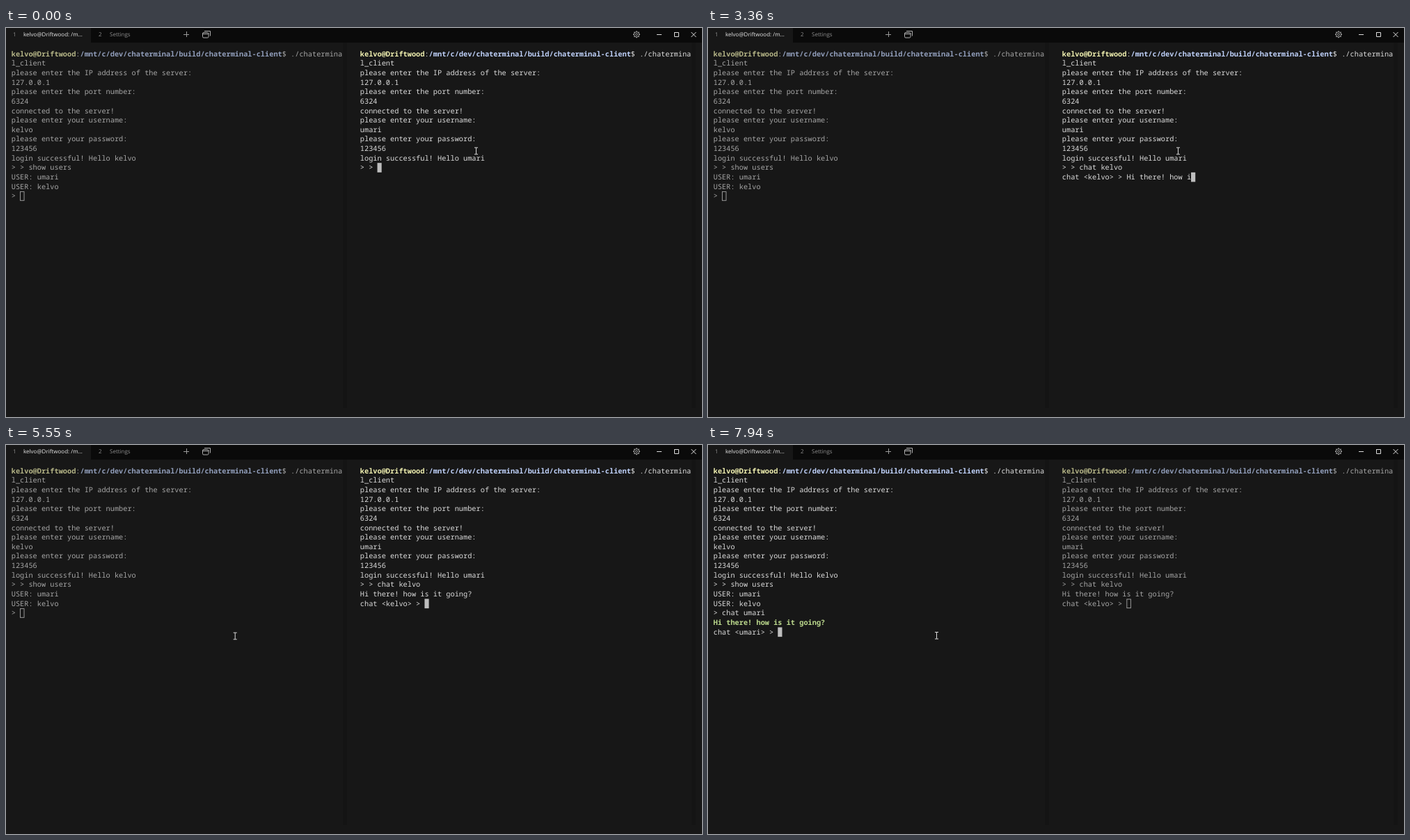
An HTML page with a canvas for the animation above (8 s loop, 1000 by 560 pixels).

```html
<!DOCTYPE html>
<html lang="en">
<head>
<meta charset="utf-8">
<title>Terminal chat</title>
<style>
  html, body { margin: 0; height: 100%; overflow: hidden; background: #171717; }
  canvas { display: block; }
</style>
</head>
<body>
<canvas id="stage" width="1000" height="560"></canvas>
<script>
const ctx = document.getElementById('stage').getContext('2d');
ctx.textRendering = 'geometricPrecision';
ctx.textBaseline = 'alphabetic';

const LOOP = 8000, CELL = 6.175, ROW = 13.65, TOP = 30.4, DIM = 0.72;
const MONO = '10.29px "Noto Sans Mono", "DejaVu Sans Mono", monospace';
const WHITE = '#dcdcdc', YELLOW = '#f0f0b0', BLUE = '#c0d2fb', GREEN = '#bbd88c';
const LEFT = 'kelvo', RIGHT = 'umari', HOST = 'Driftwood';

const clamp = v => Math.min(1, Math.max(0, v));
const lerp = (a, b, p) => a + (b - a) * p;
const ease = p => p * p * (3 - 2 * p);

// Part of a text that has been typed by time t, one character per step.
const typed = (t, text, start, step) =>
  text.slice(0, Math.max(0, Math.floor((t - start) / step) + 1));

function box(color, x, y, w, h) {
  ctx.fillStyle = color;
  ctx.fillRect(x, y, w, h);
}

function path(color, points, width = 1) {
  ctx.strokeStyle = color;
  ctx.lineWidth = width;
  ctx.beginPath();
  points.forEach(([x, y]) => ctx.lineTo(x, y));
  ctx.stroke();
}

function write(text, x, row, color = WHITE, weight = 500) {
  ctx.font = `${weight} ${MONO}`;
  ctx.fillStyle = color;
  const y = Math.round(TOP + row * ROW + 10.2);
  [...text].forEach((c, i) => ctx.fillText(c, x + i * CELL, y));
}

function label(text, x, color) {
  ctx.font = '8px "Open Sans", "Noto Sans", sans-serif';
  ctx.fillStyle = color;
  ctx.fillText(text, x, 12);
}

function titleBar() {
  box('#0a0a0a', 122, 0, 878, 21);
  label('1', 10, '#8c8c8c');
  label(`${LEFT}@${HOST}: /m...`, 25, '#e6e6e6');
  label('2', 133, '#8c8c8c');
  label('Settings', 149, '#8c8c8c');

  path('#9a9a9a', [[255, 9.5], [263, 9.5]]);
  path('#9a9a9a', [[259.5, 5], [259.5, 13]]);

  ctx.strokeStyle = '#b0b0b0';
  ctx.beginPath();
  ctx.roundRect(282.5, 6.5, 8.5, 7.5, 1.5);
  ctx.stroke();
  path('#b0b0b0', [[283, 8.5], [291, 8.5]]);
  path('#b0b0b0', [[285, 4.5], [293.5, 4.5], [293.5, 11.5]]);

  // Gear: eight short teeth around a ring
  ctx.strokeStyle = '#a8a8a8';
  ctx.lineWidth = 0.9;
  for (const r of [1.5, 3.7]) {
    ctx.beginPath();
    ctx.arc(906, 9.3, r, 0, 7);
    ctx.stroke();
  }
  for (let i = 0; i < 8; i++) {
    const a = i * Math.PI / 4, c = Math.cos(a), s = Math.sin(a);
    path('#a8a8a8', [[906 + 3.7 * c, 9.3 + 3.7 * s], [906 + 5 * c, 9.3 + 5 * s]], 1.4);
  }

  path('#dddddd', [[935, 9.5], [942, 9.5]]);
  path('#dddddd', [[960.5, 6.5], [966.5, 6.5], [966.5, 12.5], [960.5, 12.5], [960.5, 6]]);
  path('#dddddd', [[984.5, 6], [991.5, 13]]);
  path('#dddddd', [[991.5, 6], [984.5, 13]]);
}

function pane(x, user, lines, focused, light) {
  ctx.globalAlpha = lerp(DIM, 1, light);
  let at = x;
  const part = (text, color, weight) => {
    write(text, at, 0, color, weight);
    at += text.length * CELL;
  };
  part(`${LEFT}@${HOST}`, YELLOW, 700);
  part(':');
  part('/mnt/c/dev/chaterminal/build/chaterminal-client', BLUE, 700);
  part('$ ./chatermina');

  const rows = [
    'l_client',
    'please enter the IP address of the server:', '127.0.0.1',
    'please enter the port number:', '6324',
    'connected to the server!',
    'please enter your username:', user,
    'please enter your password:', '123456',
    `login successful! Hello ${user}`,
    ...lines
  ];
  rows.forEach((row, i) => row.green
    ? write(row.green, x, i + 1, GREEN, 700)
    : write(row, x, i + 1));

  const cx = x + rows.at(-1).length * CELL, cy = TOP + rows.length * ROW;
  if (focused) {
    box('#bebebe', cx, cy, CELL, ROW);
  } else {
    ctx.strokeStyle = WHITE;
    ctx.lineWidth = 0.9;
    ctx.strokeRect(cx + 0.4, cy + 0.5, CELL - 0.6, ROW - 1);
  }
  ctx.globalAlpha = 1;
}

function rightLines(t) {
  const command = '> > chat ' + LEFT, prompt = `chat <${LEFT}> > `;
  if (t < 1800) return ['> > ' + typed(t, 'cha', 765, 35) + typed(t, 't ' + LEFT, 1035, 100)];
  if (t >= 4955) return [command, 'Hi there! how is it going?', prompt];
  let text = typed(t, 'Hi there! how is ', 2295, 75) + typed(t, 'it going/', 3625, 90);
  // The slash is deleted and typed again as a question mark.
  if (t >= 4615) text = text.slice(0, -1);
  if (t >= 4685) text += '?';
  return [command, prompt + text];
}

function leftLines(t) {
  const lines = ['> > show users', 'USER: ' + RIGHT, 'USER: ' + LEFT,
    '> ' + typed(t, 'chat ' + RIGHT, 7005, 70)];
  if (t >= 7805) lines.push({ green: 'Hi there! how is it going?' }, `chat <${RIGHT}> > `);
  return lines;
}

function pointer(t) {
  const p = ease(clamp((t - 5000) / 550)), settle = clamp((t - 6100) / 250);
  const x = lerp(675.5, 329.2, p) - 0.7 * settle, y = lerp(177, 275, p) - 0.7 * settle;
  path('#dadada', [[x, y - 4.5], [x, y + 4.5]]);
  for (const d of [-4.8, 4.8]) path('#dadada', [[x - 2.5, y + d], [x + 2.5, y + d]]);
}

function draw(now) {
  const t = now % LOOP;
  const swap = clamp((t - 5750) / 600), onLeft = t >= 5745;
  box('#171717', 0, 0, 1000, 560);
  titleBar();
  for (const x of [484, 985]) box('#141414', x, 21, 6, 526);
  pane(7.7, LEFT, leftLines(t), onLeft, swap);
  pane(508.8, RIGHT, rightLines(t), !onLeft, 1 - swap);
  pointer(t);
}

const start = performance.now();
function tick() {
  draw(performance.now() - start);
  requestAnimationFrame(tick);
}
tick();
</script>
</body>
</html>
```
